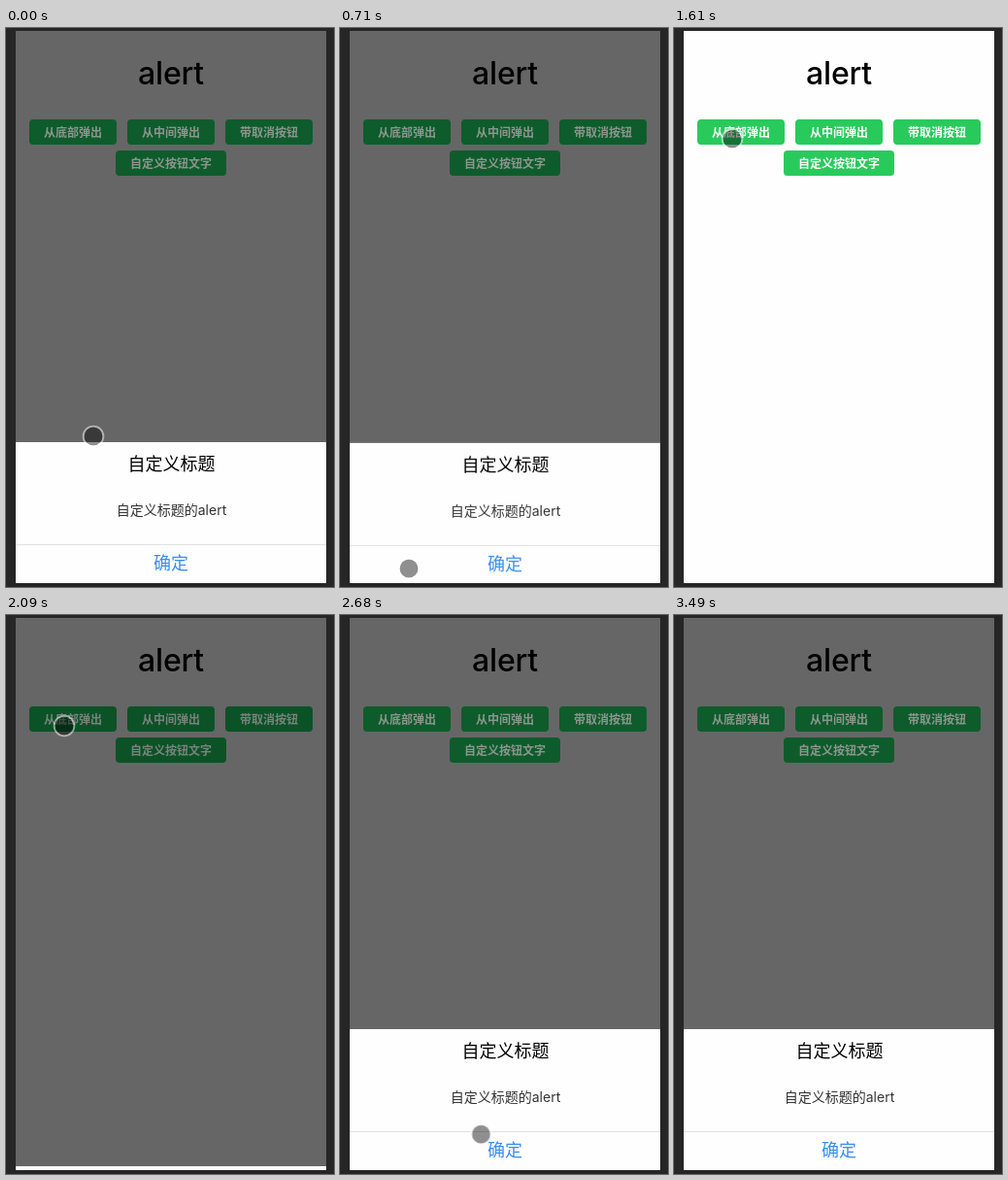
These frames come from a looping animation (338x575 px, 3.98 s). An HTML page:

```html
<!DOCTYPE html>
<html lang="zh-CN">
<head>
<meta charset="utf-8">
<title>alert</title>
<style>
  html, body { margin: 0; width: 100%; height: 100%; overflow: hidden; background: #262626; }
  svg { display: block; width: 338px; height: 575px; overflow: hidden; }
  text { text-anchor: middle; font-family: Inter, "Noto Sans CJK SC", "Noto Sans CJK", sans-serif; }

  h1, .heading { font-size: 32px; font-weight: 500; letter-spacing: -.2px; }
  .title, .ok { font-size: 18px; }
  .message { font-size: 14px; fill: #333; }
  .ok { fill: #3a8df2; }
  .label { font-size: 12px; font-weight: 700; }

  .dim, .panel, .cursor, .button, .label { animation: 3980ms linear infinite; }
  .dim { animation-name: dim; animation-timing-function: step-end; }
  .button { animation-name: button; animation-timing-function: step-end; }
  .label { animation-name: label; animation-timing-function: step-end; }
  .panel { animation-name: panel; }
  .cursor { animation-name: cursor; }

  @keyframes dim {
    0%, 52.45% { opacity: 1; }
    22.8% { opacity: 0; }
  }
  @keyframes button {
    0%, 58% { fill: #0e5c2b; }
    22.8% { fill: #29ca5c; }
    52.45% { fill: #0c5227; }
  }
  @keyframes label {
    0%, 58% { fill: #8c958f; }
    22.8% { fill: #fff; }
    52.45% { fill: #78837c; }
  }
  @keyframes panel {
    0%, 17.8% { transform: none; animation-timing-function: ease; }
    22.8%, 52.44% { transform: translateY(146px); }
    52.45% { transform: translateY(142px); animation-timing-function: ease; }
    57.5%, 100% { transform: none; }
  }
  @keyframes cursor {
    0%, .75% { transform: translate(90px, 420px); }
    3% { transform: translate(93px, 446px); }
    6.5% { transform: translate(84px, 510px); }
    9.78%, 18.8% { transform: translate(71px, 556px); }
    22.86% { transform: translate(105px, 542px); }
    24.1% { transform: translate(142px, 490px); }
    25.4% { transform: translate(112px, 390px); }
    27.4% { transform: translate(-4px, 138px); }
    34.9% { transform: translate(-4px, 138px); animation-timing-function: ease-out; }
    40.4% { transform: translate(60px, 114px); }
    56.5% { transform: translate(60px, 114px); animation-timing-function: ease-in; }
    60% { transform: translate(60px, 170px); }
    64.3%, 65.8% { transform: translate(67px, 363px); }
    67.34% { transform: translate(145px, 534px); }
    71% { transform: translate(212px, 556px); }
    73.5% { transform: translate(219px, 560px); }
    78.4% { transform: translate(90px, 560px); }
    80.4% { transform: translate(68px, 558px); }
    85% { transform: translate(257px, 552px); }
    87.5%, 100% { transform: translate(262px, 590px); }
  }
</style>
</head>
<body>
<svg viewBox="0 0 338 575">
  <clipPath id="screen"><rect x="10" y="3" width="320" height="568"/></clipPath>
  <rect width="338" height="575" fill="#262626"/>
  <g clip-path="url(#screen)">
    <rect x="10" y="3" width="320" height="568" fill="#fefefe"/>
    <rect class="dim" x="10" y="3" width="320" height="568" fill="#666"/>
    <text class="heading" x="170" y="58">alert</text>

    <rect class="button" x="24" y="94" width="90" height="26" rx="4"/>
    <rect class="button" x="125" y="94" width="90" height="26" rx="4"/>
    <rect class="button" x="226" y="94" width="90" height="26" rx="4"/>
    <rect class="button" x="113" y="126" width="114" height="26" rx="4"/>
    <text class="label" x="69" y="111.5">从底部弹出</text>
    <text class="label" x="170" y="111.5">从中间弹出</text>
    <text class="label" x="271" y="111.5">带取消按钮</text>
    <text class="label" x="170" y="143.5">自定义按钮文字</text>

    <g class="panel">
      <rect x="10" y="426" width="320" height="145" fill="#fefefe"/>
      <text class="title" x="170.5" y="455">自定义标题</text>
      <text class="message" x="170.5" y="501">自定义标题的alert</text>
      <rect x="10" y="531" width="320" height="1" fill="#e0e0e0"/>
      <text class="ok" x="170" y="557">确定</text>
    </g>
  </g>
  <g class="cursor">
    <circle r="9.5" fill="#000" fill-opacity=".435"/>
    <circle r="10.4" fill="none" stroke="#fff" stroke-opacity=".5" stroke-width="1.8"/>
  </g>
</svg>
</body>
</html>
```
